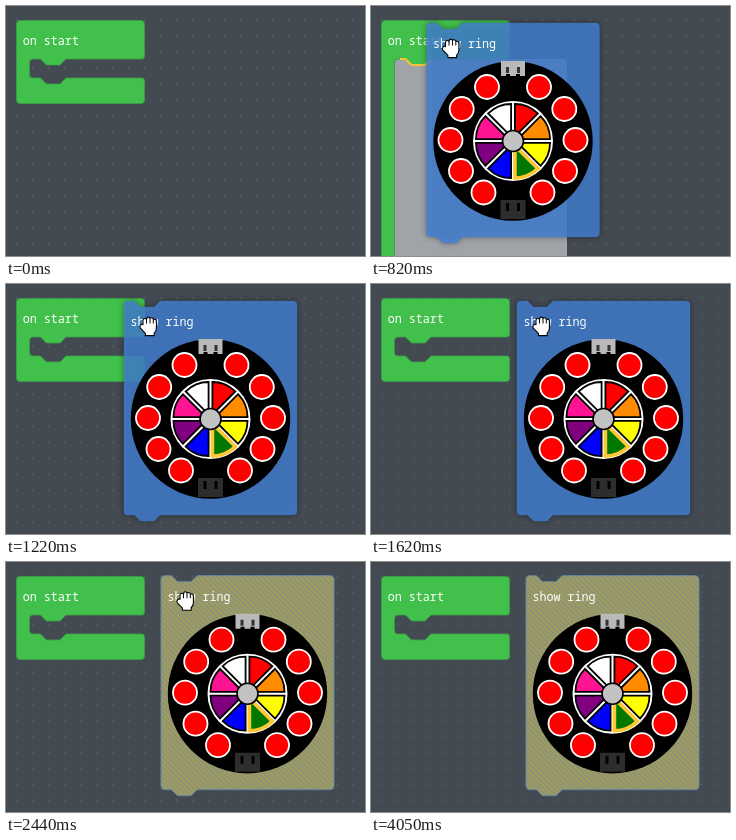
An HTML page for the animation above (4470 ms loop, 359x250 px).

```html
<!DOCTYPE html>
<html lang="en">
<head>
<meta charset="utf-8">
<title>Show ring block</title>
<style>
  html, body { margin: 0; width: 100%; height: 100%; overflow: hidden; background: #434a52; }
  svg { display: block; width: 100vw; height: 100vh; }
  text { font: 500 11.7px "Noto Sans Mono", "DejaVu Sans Mono", monospace; fill: #fff; white-space: pre; }
  .hand { fill: #fff; stroke: #000; stroke-width: 1; stroke-linejoin: round; }
  .hand .gap { fill: none; stroke-width: .9; }
  .dragging { filter: drop-shadow(0 0 3px rgba(0, 0, 0, .45)); }
</style>
</head>
<body>
<svg viewBox="0 0 359 250">
  <defs>
    <pattern id="dots" x="10" y="13.5" width="16" height="16" patternUnits="userSpaceOnUse">
      <rect width="1.5" height="1.5" fill="#5b636b"/>
    </pattern>
    <pattern id="hatch" width="5" height="5" patternUnits="userSpaceOnUse">
      <rect width="5" height="5" fill="#a29d58"/>
      <path d="M-1 4L1 6M0 0L5 5M4 -1L6 1" stroke="#858f88" stroke-width="1.3"/>
    </pattern>
  </defs>
  <rect width="359" height="250" fill="#434a52"/>
  <rect width="359" height="250" fill="url(#dots)"/>

  <path id="slot" fill="#a0a3a8"/>
  <path id="start" fill="#41c04b" stroke="#389f44" stroke-width=".8"/>
  <path id="glow" fill="none" stroke="#f3c536" stroke-width="2.2" d="M29 53H34.5L40.5 59H54L60 53"/>
  <text x="16.8" y="39">on start</text>

  <g id="block">
    <path id="body"/>
    <text x="6.5" y="25">show ring</text>
    <g id="ring" transform="translate(86.5 118)">
      <circle r="79.7"/>
      <path fill="#b9b9b9" d="M-12 -80H12V-65H7V-67H3V-65H-3V-67H-7V-65H-12Z"/>
      <path fill="#333" d="M-7 -74h3v6h-3zM4 -74h3v6h-3z"/>
      <rect x="-12.5" y="59" width="25" height="19" fill="#2d2d2d"/>
      <path d="M-7 62h3v8h-3zM4 62h3v8h-3z"/>
    </g>
  </g>

  <g id="grab" class="hand">
    <g transform="scale(1.1)">
      <path d="M3.8 8V4Q4 2.5 5.4 2.5T7 3.5Q7.2 1.2 8.6 1.2T10.2 2.6Q10.6 1.6 11.8 1.8T13.2 3.4Q13.6 2.8 14.8 3.2T16 5V11Q16 14 14 15.5V18H6V16L1.4 11.2Q.4 9.6 1.6 8.4T3.8 8Z"/>
      <path class="gap" d="M7 3.5V7M10.2 3V7M13.2 3.6V7"/>
    </g>
  </g>
  <g id="open" class="hand">
    <path d="M4.5 11V4.2Q4.5 2.8 5.8 2.8T7 4.2V2Q7.2 .8 8.5 .8T9.8 2V3Q10 1.8 11.3 1.8T12.6 3.2V6Q13 4.8 14.4 5T15.8 6.5V15Q15.8 18 13.8 20V22.5H6.5V20.5L1 13.5Q.2 12 1.4 11.2T3.6 12L4.5 13Z"/>
    <path class="gap" d="M7 4V11M9.8 3V11M12.6 5V11"/>
  </g>
  <g id="arrow" class="hand">
    <path d="M.5 .5V16.2L4.2 12.8L6.6 18.4L9 17.4L6.6 12H11.6Z"/>
  </g>
</svg>
<script>
const LOOP = 4470;
const el = id => document.getElementById(id);
const ring = el("ring");

function add(tag, attrs) {
  const node = document.createElementNS("http://www.w3.org/2000/svg", tag);
  for (const key in attrs) node.setAttribute(key, attrs[key]);
  ring.appendChild(node);
}

// Connector notches, drawn left to right or right to left.
const notch = "l6 6h13.5l6 -6";
const notchBack = "l-6 6h-13.5l-6 -6";

const blockPath = (w, h) =>
  `M0 4Q0 0 4 0H10.5${notch}H${w - 4}Q${w} 0 ${w} 4V${h - 4}Q${w} ${h} ${w - 4} ${h}` +
  `H36${notchBack}H4Q0 ${h} 0 ${h - 4}Z`;

// Container block whose mouth is `gap` pixels tall.
function startPath(gap) {
  const low = 53 + gap, end = low + 25.5;
  return `M10.5 18Q10.5 14.5 14 14.5H135Q138.5 14.5 138.5 18V50Q138.5 53 136 53` +
    `H60${notchBack}H27Q23.5 53 23.5 56.5V${low - 3.5}Q23.5 ${low} 27 ${low}` +
    `H34.5${notch}H136Q138.5 ${low} 138.5 ${low + 3}V${end - 3.5}` +
    `Q138.5 ${end} 135 ${end}H14Q10.5 ${end} 10.5 ${end - 3.5}Z`;
}

el("body").setAttribute("d", blockPath(173, 214));
el("slot").setAttribute("d", blockPath(172.5, 214));
el("slot").setAttribute("transform", "translate(23.5 53)");

// Lights: one side listed, the other mirrored.
for (const [x, y] of [[26, -54], [51.3, -32], [62.5, -1], [52, 30], [29.5, 51.5]])
  for (const side of [-1, 1])
    add("circle", { cx: side * x, cy: y, r: 12, fill: "#f00", stroke: "#fff", "stroke-width": 1.8 });

// Colour wheel, clockwise from the top: white disc, black-edged wedges.
const colors = ["#f00", "#ff8c00", "#ff0", "#007800", "#00f", "#800080", "#ff1493", "#fff"];
const s = Math.sin(Math.PI / 8), c = Math.cos(Math.PI / 8);
const wedge = (a, b) =>
  `M${-a * s} ${-a * c}L${-b * s} ${-b * c}A${b} ${b} 0 0 1 ${b * s} ${-b * c}L${a * s} ${-a * c}Z`;
const addWedge = (i, stroke, width) => add("path", {
  d: wedge(5, 32.4), fill: colors[i], stroke, "stroke-width": width,
  transform: `rotate(${i * 45 + 22.5}) translate(0 -5)`
});
add("circle", { r: 40, fill: "#fff" });
colors.forEach((_, i) => addWedge(i, "#000", 1.8));
addWedge(3, "#ffc832", 3.6);
add("circle", { r: 10.5, fill: "#c2c2c2", stroke: "#000", "stroke-width": 1.6 });

// Block position: [time, x, y]
const moves = [
  [200, -54, 10], [400, -12.5, 16], [600, 6, 17], [820, 55.5, 17],
  [1020, 94.5, 17], [1220, 118, 17], [1420, 137, 16.5], [1620, 146, 17],
  [1820, 154.5, 17], [2040, 160, 15], [2440, 155, 13.7]
];
// Free pointer: [time, kind, x, y]
const pointer = [
  [3050, "open", 171, 30.7], [3450, "open", 151.5, 41],
  [3650, "arrow", 129, 68], [3870, "arrow", 62, 201], [4050, "none", 0, 0]
];

const latest = (steps, t) => steps.filter(step => step[0] <= t).pop();
const show = (id, on) => el(id).setAttribute("visibility", on ? "visible" : "hidden");
const place = (id, x, y) => el(id).setAttribute("transform", `translate(${x} ${y})`);

function render(t) {
  const move = latest(moves, t);
  const free = latest(pointer, t);
  const hover = t >= 820 && t < 1220;
  const dropped = t >= 2440;

  el("start").setAttribute("d", startPath(hover ? 214 : 19));
  show("slot", hover);
  show("glow", hover);

  show("block", move);
  if (move) place("block", move[1], move[2]);
  const body = el("body");
  body.setAttribute("class", dropped ? "" : "dragging");
  body.setAttribute("fill", dropped ? "url(#hatch)" : "#4482d8");
  body.setAttribute("fill-opacity", dropped ? 1 : .8);
  body.setAttribute("stroke", dropped ? "#6688a0" : "#3a6fb8");
  body.setAttribute("stroke-opacity", dropped ? 1 : .3);

  show("grab", move && !free);
  if (move) place("grab", move[1] + 14.8, move[2] + 14.8);
  for (const kind of ["open", "arrow"]) {
    const on = free && free[1] === kind;
    show(kind, on);
    if (on) place(kind, free[2], free[3]);
  }
}

const begin = performance.now();
function tick() {
  render((performance.now() - begin) % LOOP);
  requestAnimationFrame(tick);
}
tick();
</script>
</body>
</html>
```
